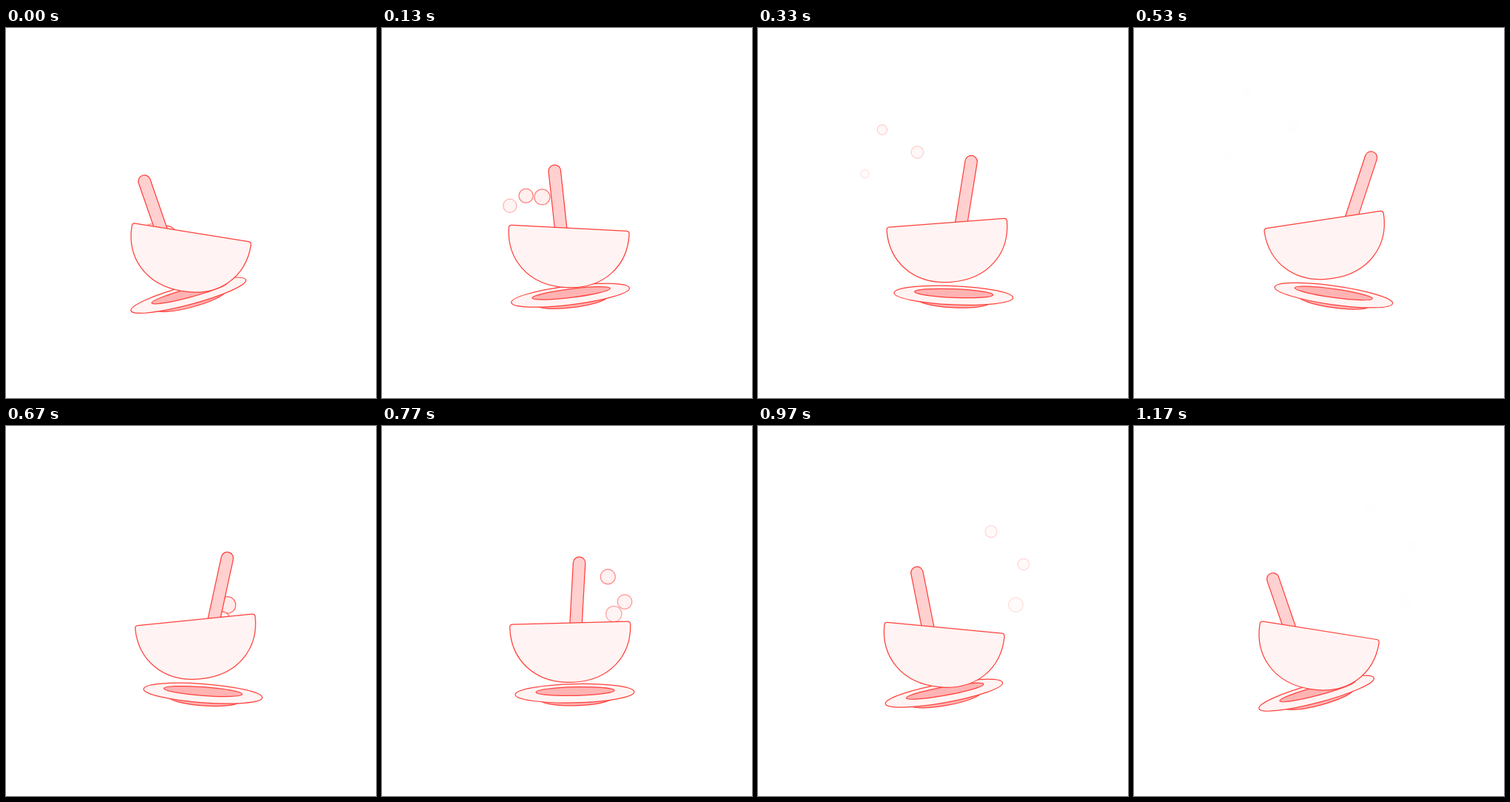
Recreate the animation shown at these times as an HTML page. Size 500 by 500 pixels, loop 1210 ms.

```html
<!DOCTYPE html>
<html lang="en">
<head>
<meta charset="utf-8">
<title>Rocking bowl</title>
<style>
  html, body { margin: 0; width: 100%; height: 100%; overflow: hidden; background: #fff; }
  svg { display: block; width: 100vw; height: 100vh; }
  svg * { stroke: #ff403b; stroke-width: 1.25; }
  .pale { fill: #fff4f3; }
  .mid { fill: #ffd0d0; }
  .deep { fill: #ffb3b3; }
  .bubble { fill: #ffe8e8; }
</style>
</head>
<body>
<svg viewBox="0 0 500 500">
  <g id="saucer">
    <ellipse class="deep" cx="1.2" cy="7" rx="49" ry="9.7"/>
    <ellipse class="pale" rx="80.4" ry="12.7"/>
    <ellipse id="well" class="deep" cy="-2.7" rx="53" ry="5.8"/>
  </g>
  <g id="bubbles"></g>
  <path id="spoon" class="mid" d="M-8.2 105V0A8.2 8.2 0 0 1 8.2 0V105Z"/>
  <path id="bowl" class="pale" d="M-77.5 0H77.5Q81.5 0 81.5 4C81.5 46 52 80.3 0 80.3C-52 80.3 -81.5 46 -81.5 4Q-81.5 0 -77.5 0Z"/>
</svg>
<script>
const LOOP = 1210, STEP = 100 / 3, STEPS = 36, HALF = STEPS / 2;
const $ = id => document.getElementById(id);
const saucer = $('saucer'), well = $('well'), spoon = $('spoon'), bowl = $('bowl');
const mix = (a, b, s) => a + (b - a) * s;

// Each bubble: [x, y, r] at start and end, and its starting opacity.
const sides = [
  [
    { from: [196.8, 276.8, 12], to: [126.3, 169.3, 3.3], alpha: 0.6 },
    { from: [217.2, 302, 12.1], to: [150.7, 80.5, 4.8], alpha: 1 },
    { from: [217.3, 279.7, 12.4], to: [214.6, 128.9, 6.8], alpha: 1 }
  ],
  [
    { from: [294.6, 270.5, 12.2], to: [320.3, 109.7, 6.9], alpha: 1 },
    { from: [294.4, 293, 12.1], to: [375.3, 159.7, 6.5], alpha: 0.95 },
    { from: [274.8, 267.6, 11.8], to: [367.4, 235, 9.2], alpha: 0.8 }
  ]
];
for (const b of sides.flat()) {
  b.el = document.createElementNS('http://www.w3.org/2000/svg', 'circle');
  b.el.setAttribute('class', 'bubble');
  $('bubbles').append(b.el);
}

// cubic-bezier(0, 0, .58, 1), solved by bisection
function easeOut(p) {
  let lo = 0, hi = 1;
  for (let i = 0; i < 30; i++) {
    const u = (lo + hi) / 2;
    if (1.74 * u * u - 0.74 * u ** 3 < p) lo = u; else hi = u;
  }
  return lo * lo * (3 - 2 * lo);
}

function place(el, x, y, angle) {
  el.setAttribute('transform', `translate(${x} ${y}) rotate(${angle})`);
}

function draw(time) {
  const step = Math.min(STEPS - 1, Math.floor((time % LOOP + 3.4) / STEP));
  const side = step < HALF ? 0 : 1;
  const e = easeOut(step % HALF / HALF);
  const s = side ? 1 - e : e;

  place(saucer, mix(246.5, 270.4, s), 361.2, mix(-15, 8.4, s));
  well.setAttribute('cx', mix(2.4, -0.6, s));
  place(spoon, mix(187, 323.2, s), 207 - 44.8 * s + 12.4 * s * s, mix(-19.1, 19, s));
  place(bowl, mix(251.2, 256.2, s), mix(276.4, 258.7, s), mix(9.15, -9, s));

  sides.forEach((list, i) => list.forEach(({ el, from, to, alpha }) => {
    ['cx', 'cy', 'r'].forEach((name, j) => el.setAttribute(name, mix(from[j], to[j], e)));
    el.setAttribute('opacity', i === side ? alpha * (1 - e) : 0);
  }));
}

const start = performance.now();
function tick() {
  draw(performance.now() - start);
  requestAnimationFrame(tick);
}
tick();
</script>
</body>
</html>
```
